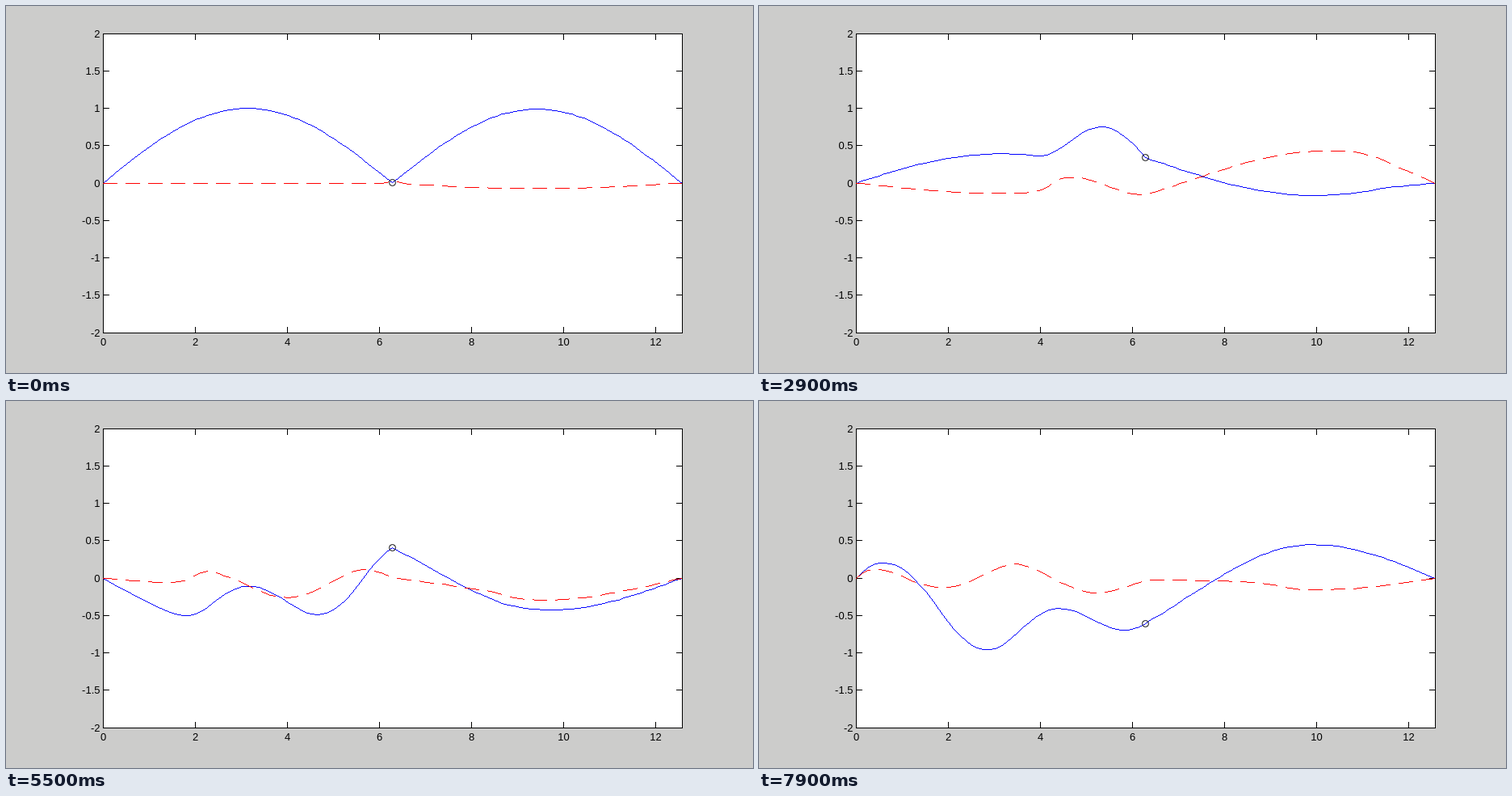
An HTML page with a canvas for the animation above (8000 ms loop, 925 by 454 pixels).

```html
<!DOCTYPE html>
<html lang="en">
<head>
<meta charset="utf-8">
<title>Bead on a two-part string</title>
<style>
  html, body { margin: 0; width: 100%; height: 100%; overflow: hidden; background: #cccccb; }
  canvas { display: block; }
</style>
</head>
<body>
<canvas id="stage" width="925" height="454"></canvas>
<script>
const ctx = document.getElementById('stage').getContext('2d');

const LOOP = 8000, HOLD = 500, STEP = 100;
const LAST = (LOOP - HOLD) / STEP;
const BOX = { left: 120, top: 34, right: 837, bottom: 404 };
const LENGTH = 4 * Math.PI;
const CELLS = 100, BEAD = CELLS / 2, DX = LENGTH / CELLS;

const px = x => Math.floor(BOX.left + x / LENGTH * (BOX.right - BOX.left));
const py = y => Math.floor((BOX.top + BOX.bottom) / 2 - y * (BOX.bottom - BOX.top) / 4);

// Heavy slack string on the left, light taut one on the right, a bead between.
function simulate() {
  const string = (tension, speed) => ({ tension, density: tension / speed ** 2 });
  const left = string(0.2, 0.3), right = string(1, 1);
  const beadMass = 4, dt = 0.01, substeps = 30;
  const u = [], v = new Array(CELLS + 1).fill(0), mass = [];
  for (let i = 0; i <= CELLS; i++) {
    u.push(i % BEAD ? Math.abs(Math.sin(i * DX / 2)) : 0);
    mass.push((i < BEAD ? left : right).density * DX);
  }
  mass[BEAD] = beadMass + (left.density + right.density) * DX / 2;

  const pull = i => (i < BEAD ? left : right).tension * (u[i + 1] - u[i]) / DX;
  const kick = h => {
    for (let i = 1; i < CELLS; i++) v[i] += h * (pull(i) - pull(i - 1)) / mass[i];
  };

  const states = [];
  for (let n = 0; n <= LAST; n++) {
    for (let k = 0; k < substeps; k++) {
      kick(dt / 2);
      for (let i = 1; i < CELLS; i++) u[i] += dt * v[i];
      kick(dt / 2);
    }
    states.push({ u: u.slice(), v: v.slice() });
  }
  return states;
}

// Hard-edged one-pixel polyline, optionally dashed.
function plot(values, color, on = 1, off = 0) {
  ctx.fillStyle = color;
  let count = 0;
  for (let i = 0; i < CELLS; i++) {
    const x0 = px(i * DX), y0 = py(values[i]);
    const dx = px((i + 1) * DX) - x0, dy = py(values[i + 1]) - y0;
    const steps = Math.max(Math.abs(dx), Math.abs(dy));
    for (let k = 0; k < steps; k++, count++) {
      if (count % (on + off) >= on) continue;
      ctx.fillRect(Math.round(x0 + dx * k / steps), Math.round(y0 + dy * k / steps), 1, 1);
    }
  }
}

function drawAxes() {
  const { left, top, right, bottom } = BOX, tick = 8;
  ctx.fillStyle = '#000';
  ctx.fillRect(left, top, right - left + 1, 1);
  ctx.fillRect(left, bottom, right - left + 1, 1);
  ctx.fillRect(left, top, 1, bottom - top + 1);
  ctx.fillRect(right, top, 1, bottom - top + 1);

  ctx.font = '13px "Liberation Sans", Arial, sans-serif';
  ctx.textBaseline = 'alphabetic';
  ctx.textAlign = 'center';
  for (let x = 0; x <= 12; x += 2) {
    ctx.fillRect(px(x), top, 1, tick);
    ctx.fillRect(px(x), bottom - tick + 1, 1, tick);
    ctx.fillText(x, px(x) + 0.5, 420);
  }
  ctx.textAlign = 'right';
  for (let y = -2; y <= 2; y += 0.5) {
    ctx.fillRect(left, py(y), tick, 1);
    ctx.fillRect(right - tick + 1, py(y), tick, 1);
    ctx.fillText(y, 116.5, py(y) + 5);
  }
}

function drawBead(y) {
  ctx.strokeStyle = '#000';
  ctx.lineWidth = 1;
  ctx.beginPath();
  ctx.arc(px(BEAD * DX) + 0.5, py(y) + 0.5, 4, 0, 2 * Math.PI);
  ctx.stroke();
}

function draw({ u, v }) {
  ctx.fillStyle = '#cccccb';
  ctx.fillRect(0, 0, 925, 454);
  ctx.fillStyle = '#fff';
  ctx.fillRect(BOX.left, BOX.top, BOX.right - BOX.left, BOX.bottom - BOX.top);
  drawAxes();
  plot(u, '#0000ff');
  plot(v, '#ff0000', 18, 10);
  drawBead(u[BEAD]);
}

const states = simulate();
const start = performance.now();

function tick() {
  const t = Math.max(0, performance.now() - start) % LOOP;
  const n = t < HOLD ? 0 : Math.floor((t - HOLD) / STEP) + 1;
  draw(states[Math.min(n, LAST)]);
  requestAnimationFrame(tick);
}
tick();
</script>
</body>
</html>
```
